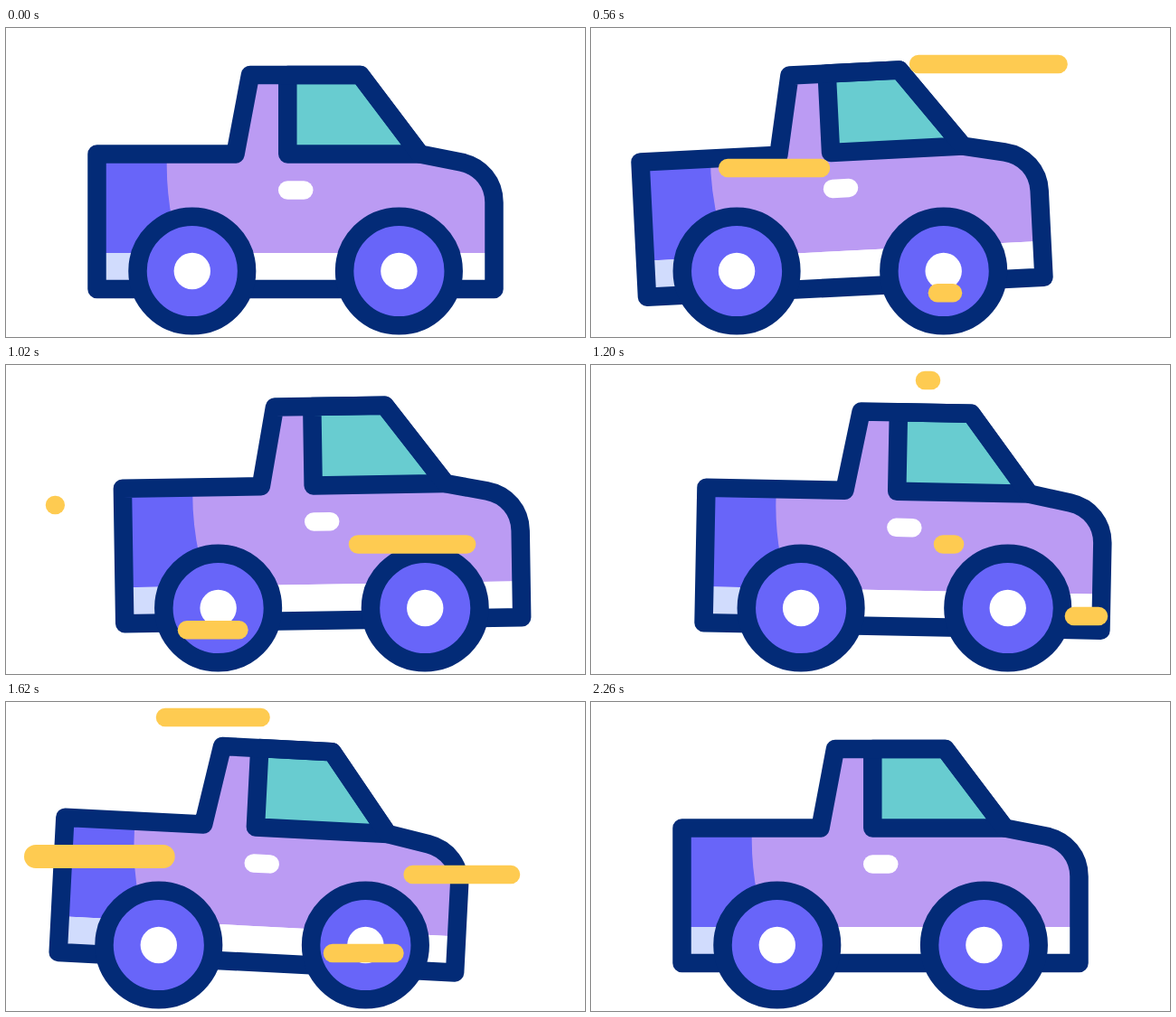
An HTML page for the animation above (2420 ms loop, 640 by 342 pixels).

```html
<!DOCTYPE html>
<html lang="en">
<head>
<meta charset="utf-8">
<title>Pickup truck</title>
<style>
  html, body { margin: 0; width: 100%; height: 100%; overflow: hidden; background: #fff; }
  svg { display: block; width: 100vw; height: 100vh; }
  .line { stroke: #032b77; stroke-width: 20.5; stroke-linecap: round; stroke-linejoin: round; }
  #streaks { stroke: #fecb51; stroke-width: 20.5; stroke-linecap: round; }
</style>
</head>
<body>
<svg viewBox="0 0 640 342">
  <defs>
    <path id="shell" d="M100.5 289V139.5H253.5L270 52H391.5L457.5 139.5L503 148.5C525 153 539.5 171 539.5 193V289Z"/>
    <clipPath id="inside"><use href="#shell"/></clipPath>
    <g id="wheel">
      <circle class="line" r="60.3" fill="#6865f9"/>
      <circle r="20.2" fill="#fff"/>
    </g>
  </defs>
  <g id="body">
    <g clip-path="url(#inside)">
      <path fill="#bb9bf3" d="M90 40H550V249H90Z"/>
      <path fill="#fff" d="M90 249H550V300H90Z"/>
      <path fill="#6865f9" d="M90 130H178.5Q175.5 172 184 215L196 249H90Z"/>
      <path fill="#d1dcfd" d="M90 249H196V300H90Z"/>
    </g>
    <path class="line" fill="#68ccd0" d="M311.3 52H391.5L457.5 139.5H311.3Z"/>
    <use href="#shell" class="line" fill="none"/>
    <rect x="301" y="169.3" width="38.5" height="20.5" rx="10.25" fill="#fff"/>
  </g>
  <g id="wheels">
    <use href="#wheel" x="205.8" y="269"/>
    <use href="#wheel" x="434.4" y="269"/>
  </g>
  <g id="streaks"></g>
</svg>
<script>
const LOOP = 2420, RIDE = 2200;               // the truck rests after RIDE ms
const DRAW = 450, LAG = 257, LENGTH = 200;    // each streak grows, then is wiped away

const { PI, sin, cos, min, max } = Math;
const $ = id => document.getElementById(id);
const ease = u => (1 - cos(PI * min(1, max(0, u)))) / 2;

// Sways left, right, left and back: each ease adds one move
const shift = t => -45 * ease(t / 590) + 78 * ease((t - 590) / 505)
  - 70 * ease((t - 1095) / 525) + 37 * ease((t - 1620) / 550);
const tilt = u => -4 * sin(2 * PI * u) * sin(PI * u);
const bounce = u => 6.8 * sin(4 * PI * u) - 3.3 * sin(PI * u) ** 2;

function addStreak(start, x, y, width) {
  const line = document.createElementNS($('streaks').namespaceURI, 'line');
  line.setAttribute('y1', y);
  line.setAttribute('y2', y);
  if (width) line.setAttribute('style', `stroke-width: ${width}`);
  $('streaks').append(line);
  return t => {
    const head = ease((t - start) / DRAW), tail = ease((t - start - LAG) / DRAW);
    line.setAttribute('x1', x - LENGTH * head);
    line.setAttribute('x2', x - LENGTH * tail);
    line.setAttribute('visibility', head - tail > 0.001 ? 'visible' : 'hidden');
  };
}

const streaks = [
  addStreak(228, 530, 40),
  addStreak(331, 254, 155),
  addStreak(475, 400, 293.3),
  addStreak(567, 589, 198.5),
  addStreak(1092, 561, 278),
  addStreak(1146, 376, 17),
  addStreak(1202, 230.5, 171, 26),
  addStreak(1383, 558, 191)
];

function render(now) {
  const t = now % LOOP, u = min(1, t / RIDE), dx = shift(t);
  $('wheels').setAttribute('transform', `translate(${dx} 0)`);
  $('body').setAttribute('transform',
    `translate(${dx} ${bounce(u)}) rotate(${tilt(u)} 320 170)`);
  for (const draw of streaks) draw(t);
}

let origin;
function tick(now) {
  origin ??= now;
  render(now - origin);
  requestAnimationFrame(tick);
}
render(0);
requestAnimationFrame(tick);
</script>
</body>
</html>
```
